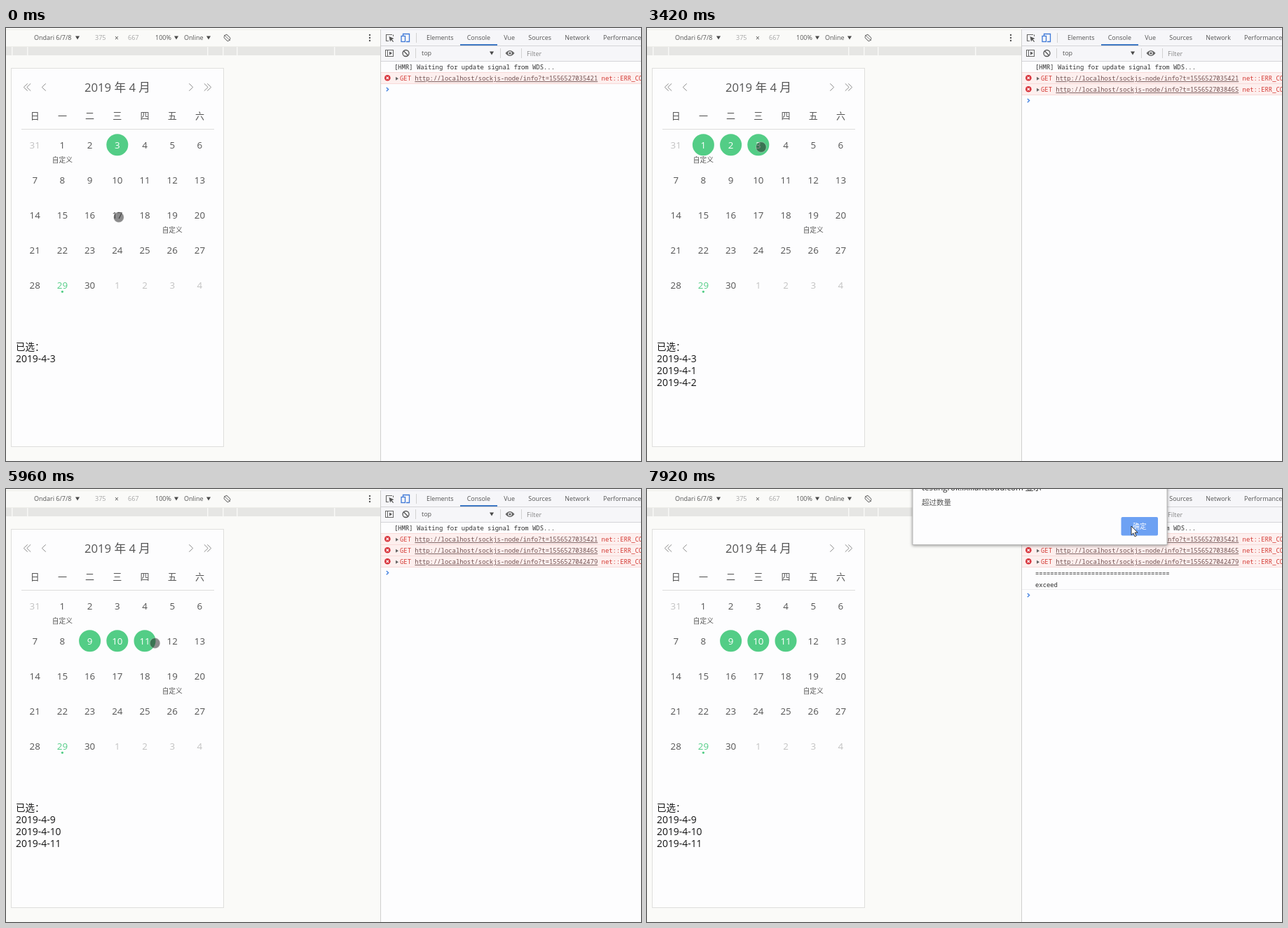
Recreate the animation shown at these times as an HTML page. Size 906 px wide and 618 px high, loop 8000 ms.

```html
<!DOCTYPE html>
<html lang="zh-CN">
<head>
<meta charset="utf-8">
<title>Calendar multi-select</title>
<style>
  html, body { margin: 0; width: 100%; height: 100%; overflow: hidden; background: #fdfdfe; }
  svg { display: block; }
  text { font-family: "Open Sans", "Noto Sans CJK SC", "Noto Sans CJK", sans-serif; white-space: pre; }
  .mono { font-family: "Noto Sans Mono", "DejaVu Sans Mono", monospace; }
  .link { text-decoration: underline; }
</style>
</head>
<body>
<svg width="906" height="618" viewBox="0 0 906 618">
  <g id="chrome"></g>
  <g id="live"></g>
</svg>
<script>
const LOOP = 8000;
const GREEN = '#53cd86', INK = '#545454', PALE = '#c2c2c2', BLACK = '#141414';

// Drawing helpers; y is the vertical middle of a line of text.
const text = (x, y, s, size = 9, fill = INK, extra = '') =>
  `<text x="${x}" y="${y + size * .36}" font-size="${size}" fill="${fill}" ${extra}>${s}</text>`;
const centred = (x, y, s, size, fill) => text(x, y, s, size, fill, 'text-anchor="middle"');
const mono = (x, y, s, fill = '#303030') => text(x, y, s, 8.88, fill, 'class="mono"');
const rect = (x, y, w, h, fill, extra = '') =>
  `<rect x="${x}" y="${y}" width="${w}" height="${h}" fill="${fill}" ${extra}/>`;
const circle = (x, y, r, fill, extra = '') =>
  `<circle cx="${x}" cy="${y}" r="${r}" fill="${fill}" ${extra}/>`;
const line = (d, stroke, width = 1) =>
  `<path d="${d}" fill="none" stroke="${stroke}" stroke-width="${width}"/>`;
const shape = (d, fill) => `<path d="${d}" fill="${fill}"/>`;
const caret = (x, y) => shape(`M${x - 3} ${y - 2.5}h6l-3 5z`, '#484848');
const chevron = (x, y, dir) => line(`M${x + 2.7 * dir} ${y - 5.2}l${-5.4 * dir} 5.2l${5.4 * dir} 5.2`, '#8d8d8d');

function deviceArea() {
  const ruler = [8, 30, 287, 309, 329, 468].map(x => rect(x, 27, 1.5, 12, '#f8f8f6')).join('');
  return rect(0, 0, 534, 618, '#fafaf8') +
    line('M0 2.5H534M0 26.5H534', '#eeeeea') +
    rect(0, 27, 534, 12, '#e6e6e4') + ruler +
    text(40, 14, 'Ondari 6/7/8') + caret(102, 14) +
    text(127, 14, '375', 9, '#a5a5a5') + text(155, 14.5, '×', 10) + text(174, 14, '667', 9, '#a5a5a5') +
    text(213, 14, '100%') + caret(243, 14) +
    text(254, 14, 'Online') + caret(289, 14) +
    rect(312.5, 9.5, 6, 9, 'none', 'rx="2" stroke="#777" transform="rotate(-45 315.5 14)"') + line('M311 10l9 8', '#777') +
    [10, 14, 18].map(y => circle(519, y, 1.2, '#555')).join('') +
    rect(7.5, 57.5, 303, 540, '#fdfdfe', 'stroke="#dfdfdd"');
}

function devtoolsBars() {
  const tabs = ['Elements', 'Console', 'Vue', 'Sources', 'Network', 'Performance']
    .map((s, i) => `<tspan dx="${i ? 19.2 : 0}">${s}</tspan>`).join('');
  return rect(534, 0, 372, 618, '#fdfdfe') + rect(535, 0, 371, 47, '#f6f6f9') +
    line('M534.5 2V618', '#cfcfcf') + line('M535 2.5H906', '#e8e8ee') +
    line('M535 25.5H906M535 47.5H906', '#d4d4d8') +
    line('M585.5 7V21M584.5 29V43M705.5 29V43M735.5 29V43', '#d2d2d2') +
    text(600, 14, tabs, 8.95) + rect(648, 23, 53, 2, '#3f79c4') +
    line('M551 9.5H542.5V18.5H546M552.5 9.5V12', '#666', 1.1) + shape('M546.5 12l7 3-3 1.2 2.6 3-1 .8-2.6-3-1.5 2.4z', '#555') +
    line('M566.5 11V8.5H575.5V19.5H571', '#3f79d8', 1.3) + rect(564, 11.5, 5.5, 8, '#f6f6f9', 'stroke="#3f79d8" stroke-width="1.3"') +
    rect(541.5, 31.5, 11, 9, 'none', 'stroke="#666"') + line('M544.5 32V40', '#666') + shape('M547 33.5l4 2.5-4 2.5z', '#555') +
    circle(570.5, 36, 4.5, 'none', 'stroke="#555" stroke-width="1.3"') + line('M567.3 32.8l6.4 6.4', '#555', 1.3) +
    text(593, 36, 'top') + caret(693, 36) +
    shape('M712.5 36q6.5-8 13 0q-6.5 8-13 0z', '#666') + circle(719, 36, 2.7, '#f6f6f9') + circle(719, 36, 1.5, '#555') +
    text(743, 36.5, 'Filter', 9, '#858585');
}

// A day number, or a fraction for a spot between two days, as a place on the grid.
const cell = day => [41.2 + 39.2 * (day % 7), 167 + 50 * Math.floor(day / 7)];

function calendar(selected) {
  let out = [28, 32.5, 54].map(x => chevron(x, 84.5, 1) + chevron(318 - x, 84.5, -1)).join('') +
    centred(159, 84.5, '2019 年 4 月', 16.7, INK) +
    line('M22 144.5H297', '#dcdcdc');
  [...'日一二三四五六'].forEach((s, i) => out += centred(cell(i)[0], 125, s, 13, INK));
  for (let day = 0; day < 35; day++) {
    const [x, y] = cell(day);
    const inMonth = day > 0 && day < 31, on = selected.includes(day);
    if (on) out += circle(x, y - .3, 15.5, GREEN);
    const fill = on ? '#fff' : !inMonth ? PALE : day === 29 ? GREEN : INK;
    out += centred(x, y, inMonth ? day : (day + 30) % 30 || 31 - day, 13.3, fill);
    if (day === 1 || day === 19) out += centred(x, y + 22, '自定义', 9.7, INK);
    if (day === 29) out += circle(x, y + 9.3, 1.6, GREEN);
  }
  return out;
}

const dateList = selected =>
  text(14, 455, '已选：', 13.5, BLACK) +
  selected.map((d, i) => text(14, 472 + 17 * i, `2019-4-${d}`, 13.9, BLACK)).join('');

// Each request is logged at the moment given by its own timestamp.
const CLOCK_START = 1556527037515;
const requests = [1556527035421, 1556527038465, 1556527042479];

function consoleLog(t, exceeded) {
  let y = 72, out = mono(554, 56, '[HMR] Waiting for update signal from WDS...');
  for (const stamp of requests.filter(s => s - CLOCK_START <= t)) {
    out += rect(535, y - 8, 371, 16, '#fdefee') + line(`M535 ${y - 8.5}H906M535 ${y + 7.5}H906`, '#f8dad8') +
      circle(544.3, y - .7, 4.3, '#d8343c') + line(`M542.6 ${y - 2.4}l3.4 3.4m0-3.4l-3.4 3.4`, '#fff', 1.1) +
      shape(`M556 ${y - 2.3}l4 2.5-4 2.5z`, '#666') +
      mono(562, y, `GET <tspan class="link" fill="#705050">http://localhost/sockjs-node/info?t=${stamp}</tspan> net::ERR_CONNECTION_REFUSED`, '#d43a34');
    y += 16;
  }
  if (exceeded) {
    out += mono(554, y + .5, '='.repeat(36)) + mono(554, y + 16.5, 'exceed') + line(`M535 ${y + 23.5}H906`, '#eeeef0');
    y += 32;
  }
  return out + line(`M542.8 ${y - 3}l2.8 2.6-2.8 2.6`, '#3f7fe0', 1.3);
}

const dialog = hovered =>
  rect(379, -20, 363, 99.5, '#fdfdfe', 'stroke="#b8b8b8" style="filter:drop-shadow(0 1px 2px #0006)"') +
  text(392, -2.2, 'testingrok.ixiliancloud.com 显示', 11.6, '#222') +
  text(392, 19, '超过数量', 10.5, INK) +
  rect(676.5, 40, 52.5, 26.5, hovered ? '#6da1f3' : '#5c97ef', 'rx="2"') +
  centred(703, 53.3, '确定', 9.7, '#fff');

// Pointer visits: arrival, departure, day. Whole days get tapped, fractions are only hovered.
const visits = [
  [0, 420, 16.95], [760, 1250, 1], [1740, 2150, 2], [2210, 2800, 2.3],
  [3420, 3610, 3], [3720, 3900, 2], [4020, 4460, 1], [4746, 4746, 16.95],
  [4880, 5060, 9], [5340, 5540, 10], [5750, 5910, 11], [6060, 6750, 12]
];
const TAP_DELAY = 180, MAX_DAYS = 3, DIALOG_DELAY = 400;
const ARROW_START = visits.at(-1)[1];

const stops = [
  ...visits.map(([arrive, leave, day]) => {
    const [x, y] = cell(day);
    return { arrive, leave, x: x + 4, y: y + 3 };
  }),
  { arrive: 7300, leave: 7300, x: 635, y: 113 },
  { arrive: 7550, leave: 7590, x: 663, y: 67 },
  { arrive: 7900, leave: LOOP, x: 691, y: 53 }
];

function pointerAt(t) {
  const i = stops.findIndex(s => t < s.leave), to = stops[i];
  if (t >= to.arrive) return [to.x, to.y];
  const from = stops[i - 1];
  const k = (t - from.leave) / (to.arrive - from.leave), e = k * k * (3 - 2 * k);
  return [from.x + (to.x - from.x) * e, from.y + (to.y - from.y) * e];
}

// Replays the taps made so far; one tap too many raises the alert.
function stateAt(t) {
  let selected = [3], exceededAt = Infinity;
  for (const [arrive, , day] of visits) {
    const tap = arrive + TAP_DELAY;
    if (tap > t || !Number.isInteger(day)) continue;
    if (selected.includes(day)) selected = selected.filter(d => d !== day);
    else if (selected.length < MAX_DAYS) selected.push(day);
    else exceededAt = tap;
  }
  return { selected, exceededAt };
}

const pointer = (t, x, y) => t < ARROW_START
  ? circle(x, y, 7.4, '#222', 'fill-opacity=".52" stroke="#fff" stroke-opacity=".4" stroke-width=".8"')
  : `<path d="M${x} ${y}v12.6l2.9-2.7 2.2 5 2.1-1-2.2-4.8h4z" fill="#fff" stroke="#222" stroke-width=".9"/>`;

const chrome = document.getElementById('chrome'), live = document.getElementById('live');
chrome.innerHTML = deviceArea() + devtoolsBars();

let shown = '';
function render(t) {
  const { selected, exceededAt } = stateAt(t);
  const [x, y] = pointerAt(t);
  const hovered = x > 677 && y < 66;
  const picture = calendar(selected) + dateList(selected) + consoleLog(t, t >= exceededAt) +
    (t >= exceededAt + DIALOG_DELAY ? dialog(hovered) : '') + pointer(t, x, y);
  if (picture !== shown) live.innerHTML = shown = picture;
}

function tick() {
  render(performance.now() % LOOP);
  requestAnimationFrame(tick);
}
tick();
</script>
</body>
</html>
```
